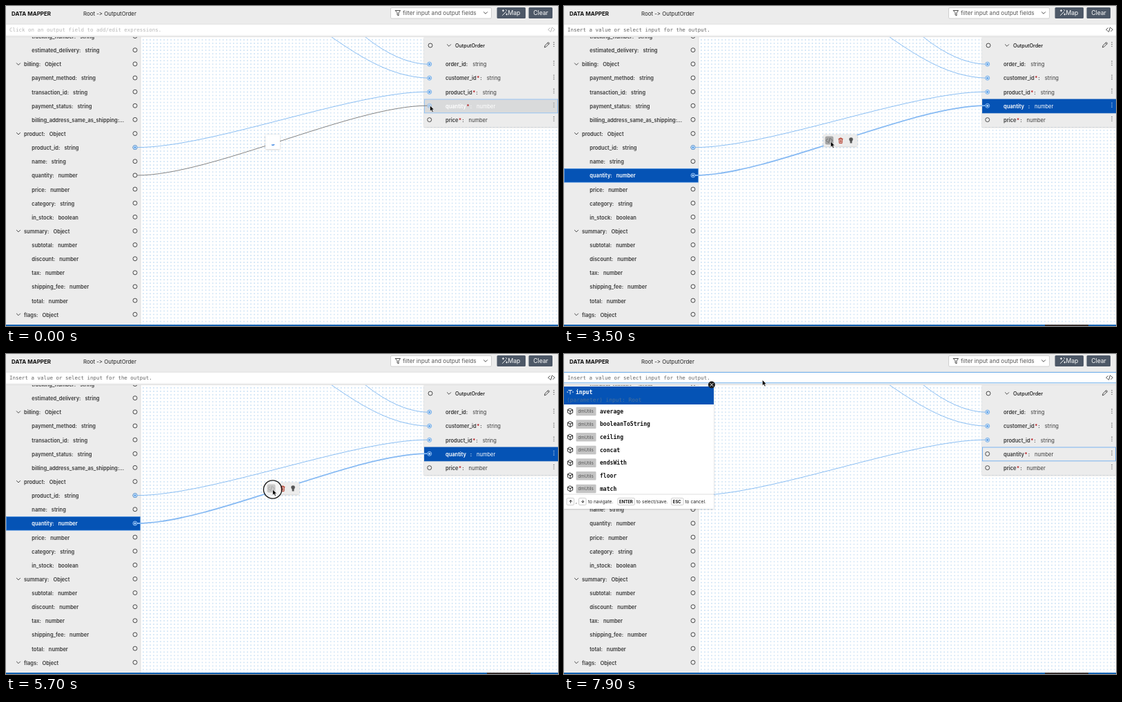
Write an HTML page that moves like this. It is 800x463 px and loops after 8 s.

```html
<!DOCTYPE html>
<html lang="en">
<head>
<meta charset="utf-8">
<title>Data mapper</title>
<style>
  html, body { margin: 0; width: 100%; height: 100%; overflow: hidden; background: #fff; }
  svg { display: block; width: 800px; height: 463px; }
  text { font: 400 7.5px Inter, sans-serif; font-feature-settings: "calt" 0; fill: #3b3b3b; white-space: pre; }
  .b { font-weight: 600; }
  .mono { font: 7.47px "DejaVu Sans Mono", monospace; }
  .name { font: 700 8.08px "DejaVu Sans Mono", monospace; fill: #111; }
  .desc { font: 7.84px "DejaVu Sans Mono", monospace; fill: #49709c; }
  .white, .white tspan { fill: #fff; }
  .line { fill: none; stroke: #3b3b3b; stroke-width: .9; stroke-linecap: round; stroke-linejoin: round; }
  .link { fill: none; stroke: #7db7f2; stroke-width: .9; }
  .thick { stroke-width: 1.8; stroke: #85b9f3; }
</style>
</head>
<body>
<svg id="stage" viewBox="0 0 800 463"></svg>
<script>
const LOOP = 8000;
const LINKED = 400, HOVER = 700, PICKED = 1600, EDIT = 3300, POPUP = 6200, CLEARED = 6900;
const BLUE = '#0553b5', PANEL = '#ececec';

const rect = (x, y, w, h, fill, more = '') =>
  `<rect x="${x}" y="${y}" width="${w}" height="${h}" fill="${fill}" ${more}/>`;
const text = (x, y, s, cls = '', more = '') => `<text x="${x}" y="${y}" class="${cls}" ${more}>${s}</text>`;
const line = (d, more = '') => `<path class="line" d="${d}" ${more}/>`;
const at = (x, y, body) => `<g transform="translate(${x} ${y})">${body}</g>`;
// Visible only between the given times, e.g. "0-400,900-1200".
const during = (times, body) => `<g data-on="${times}">${body}</g>`;

const chevron = (x, y) => line(`M${x - 2.6} ${y - 1.3}l2.6 2.6 2.6 -2.6`);
const port = (x, y) => `<circle cx="${x}" cy="${y}" r="3" fill="${PANEL}" stroke="#3b3b3b" stroke-width=".9"/>`;
const joint = (x, y, color = '#5ba4f0', back = PANEL) =>
  `<circle cx="${x}" cy="${y}" r="3" fill="${back}" stroke="${color}" stroke-width=".9"/>
   <circle cx="${x}" cy="${y}" r="1.6" fill="${color}"/>`;
const kebab = (y, color = '#444') =>
  [-2.8, 0, 2.8].map(d => `<circle cx="794" cy="${y + d}" r=".65" fill="${color}"/>`).join('');
const codeIcon = (x, y, color) =>
  at(x, y, line('M-2.3 -2.4L-4.7 0L-2.3 2.4M2.3 -2.4L4.7 0L2.3 2.4M1 -3.2L-1 3.2', `style="stroke:${color}"`));
const cube = y => at(9, y, line('M0 -4L3.6 -2.2V2L0 4L-3.6 2V-2.2ZM-3.6 -2.2L0 -.4L3.6 -2.2M0 -.4V4', 'style="stroke:#111"'));

const curve = (x1, y1, x2, y2, cls = '', more = '') =>
  `<path class="link ${cls}" d="M${x1} ${y1}C${x1 + 108} ${y1} ${x2 - 108} ${y2} ${x2} ${y2}" ${more}/>`;

// Input tree
const rowY = i => 44.3 + 20.13 * i;
const inputs = `tracking_number string|estimated_delivery string|billing Object|payment_method string
|transaction_id string|payment_status string|billing_address_same_as_shipping …|product Object
|product_id string|name string|quantity number|price number|category string|in_stock boolean
|summary Object|subtotal number|discount number|tax number|shipping_fee number|total number|flags Object`
  .replace(/\n/g, '').split('|').map(s => s.split(' '));

function inputText(i, cls = '') {
  const [name, type] = inputs[i];
  const gap = type === '…' ? 0 : 6;
  return text(type === 'Object' ? 26 : 37.3, rowY(i) + 2.8, `${name}:<tspan dx="${gap}">${type}</tspan>`, 'b ' + cls);
}

const inputPanel = `<g clip-path="url(#body)">
  ${rect(0, 45, 195, 416, PANEL)}
  ${line('M195 45V461', 'style="stroke:#dcdcdc"')}
  ${inputs.map(([, type], i) => inputText(i) + (type === 'Object' ? chevron(18, rowY(i) - .5) : '')
    + port(187, rowY(i) - .7)).join('')}
  ${joint(187, 204.6)}
  ${during(`${LINKED}-${CLEARED}`, joint(187, 245))}
  ${during(`${PICKED}-${CLEARED}`, rect(.5, 235.3, 194, 19.8, BLUE, 'stroke="#4b93e6" stroke-width=".7"')
    + inputText(10, 'white') + joint(187, 245, '#a9d0fb', BLUE))}
</g>`;

// Output tree
const outputs = [['order_id', 'string'], ['customer_id', 'string', 1], ['product_id', 'string', 1],
  ['quantity', 'number', 1], ['price', 'number', 1]];
const outY = i => 84.5 + 20.13 * i;

function outputText(i, cls = '', star = '#b3161b') {
  const [name, type, required] = outputs[i];
  const mark = required ? `<tspan dx=".6" style="fill:${star}">*</tspan><tspan dx="1">:</tspan>` : ':';
  return text(637, outY(i) + 2.8, `<tspan class="b">${name}${mark}</tspan><tspan dx="7">${type}</tspan>`, cls);
}

const outRow = (fill, stroke) => rect(606.5, 135, 193, 19.8, fill, `stroke="${stroke}" stroke-width=".9"`);
const outputPanel = `
  ${rect(606, 45, 194, 130, PANEL, 'filter="url(#shadow)"')}
  ${port(615, 57)}${chevron(642, 57)}
  ${text(651, 60, 'OutputOrder', '', 'style="font-weight:500;font-size:7.2px;fill:#111"')}
  ${line('M780.5 59.5l.7 -2.4 4.7 -4.7 1.7 1.7 -4.7 4.7zM784.8 53.5l1.7 1.7')}
  ${kebab(55.5)}
  ${outputs.map((_, i) => outputText(i) + kebab(outY(i) - 1.7)
    + (i < 3 ? joint : port)(613.7, outY(i) - .4)).join('')}
  ${during(`0-${LINKED}`, outRow('#d9dadb', '#8fc0f4') + outputText(3, 'white') + kebab(143.2, '#777')
    + joint(613.7, 144.3, '#8fc0f4', '#d9dadb'))}
  ${during(`${LINKED}-${PICKED}`, joint(613.7, 144.3))}
  ${during(`${PICKED}-${CLEARED}`, outRow(BLUE, BLUE) + outputText(3, 'white', 'transparent')
    + kebab(143.2, '#dbe9fa') + joint(613.7, 144.3, '#a9d0fb', BLUE))}
  ${during(`${CLEARED}-${LOOP}`, outRow('none', '#6eacf0'))}`;

const quantity = (cls, more) => curve(190, 245, 610.5, 144.2, cls, more);
const links = `<g clip-path="url(#body)">
  <path class="link" d="M521 45C550 68 580 83 610.5 84.2M472 45C520 78 560 102 610.5 104.2"/>
  ${curve(190, 204.6, 610.5, 124.2)}
  ${during(`0-${LINKED}`, quantity('', 'style="stroke:#777"'))}
  ${during(`${LINKED}-${HOVER}`, quantity())}
  ${during(`${HOVER}-${CLEARED}`, quantity('thick'))}
</g>`;

const loadingBox = during(`0-${LINKED}`, rect(376, 186, 21, 21, '#fff', 'rx="1.5" filter="url(#shadow)"')
  + line('M385.3 201Q387 201.6 388.6 200.6', 'style="stroke:#2f7de0;stroke-width:1.3"'));

const toolbar = during(`${PICKED}-${CLEARED}`, `
  ${rect(376, 186, 49, 17, PANEL, 'rx="1.5" filter="url(#shadow)"')}
  ${rect(378.5, 188.5, 12, 12, '#a6a6a6', 'rx="2"')}
  ${codeIcon(384.5, 194.5, '#666')}
  ${at(401, 194.8, line('M-3 -2.5H3M-1.2 -2.5V-3.8H1.2V-2.5M-2.4 -2.5L-2 3.8H2L2.4 -2.5M-.7 -.8V2.2M.8 -.8V2.2',
    'style="stroke:#b3321f"'))}
  ${at(416, 194.5, '<path d="M-1.4 1.8C-1.4 .6 -2.8 .2 -2.8 -1.4A2.8 2.8 0 0 1 2.8 -1.4C2.8 .2 1.4 .6 1.4 1.8V4H-1.4Z" fill="#555"/>')}`);

const button = (x, w, tx, label) => rect(x, 2, w, 16, '#4d5867', 'rx="1.5"')
  + text(tx, 13.2, label, 'white', 'style="font-size:8.6px"');
const header = `
  ${rect(0, 0, 800, 26, PANEL)}
  ${text(8, 14, 'DATA MAPPER', '', 'style="font-size:8px;font-weight:700;fill:#111"')}
  ${text(112, 14, 'Root -&gt; OutputOrder', '', 'style="font-size:7.9px;fill:#222"')}
  ${rect(557.5, 2.5, 146, 15.5, '#fff', 'rx="1.5" stroke="#cbcbcb" stroke-width=".9"')}
  ${line('M564.5 6.5H571.5L569 10V14L567 12.8V10Z')}
  ${text(575, 13, 'filter input and output fields', '', 'style="font-size:8.2px;fill:#555"')}
  ${chevron(695, 10)}
  ${button(711.5, 41.5, 727.5, 'Map')}${button(757.5, 34.5, 764.3, 'Clear')}
  ${line('M719.5 13.5L724.5 8.5M720.5 5.5V8M719.3 6.7H721.7M725.7 11V13M724.7 12H726.7M724.5 5.5L725.8 6.8', 'style="stroke:#fff"')}
  ${rect(0, 26, 800, 16, '#fff')}${rect(0, 42, 800, 3, '#f2f2f2')}
  ${line('M0 26.3H800M0 44.5H800', 'style="stroke:#d4d4d4;stroke-width:.7"')}
  ${during(`0-${EDIT}`, text(5, 36.7, 'Click on an output field to add/edit expressions.', 'mono', 'style="fill:#b8b8b8"')
    + codeIcon(790.5, 34.2, '#aaa'))}
  ${during(`${EDIT}-${LOOP}`, text(5, 36.7, 'Insert a value or select input for the output.', 'mono', 'style="fill:#666"')
    + codeIcon(790.5, 34.2, '#333'))}
  ${during(`${POPUP}-${LOOP}`, line('M0 26.5H800M0 41.8H800', 'style="stroke:#5ba4ea"'))}
  ${during('6200-6800,7300-7800', line('M5.2 30.5V38', 'style="stroke:#111"'))}`;

// Completion list
const functions = ['average', 'booleanToString', 'ceiling', 'concat', 'endsWith', 'floor', 'match', 'max'];
const choice = (name, y, cls = '') => cube(y) + rect(17.5, y - 6.3, 29, 12.6, '#c4c4c4', 'rx="1"')
  + text(20.3, y + 2.2, 'dmUtils', '', 'style="font-size:6.3px;fill:#555"') + text(52, y + 2.8, name, 'name ' + cls);
const choices = (names, y) => names.map((name, i) => choice(name, y + 18.66 * i)).join('');
const key = (x, w, label, tx) => rect(x, 208.5, w, 10, '#fff', 'rx="1.5" stroke="#bbb" stroke-width=".7"')
  + text(tx, 215.8, label, '', 'style="font-size:6px;font-weight:700;fill:#111"');
const hint = (x, s) => text(x, 216, s, '', 'style="font-size:6.6px;fill:#222"');

const popup = during(`${POPUP}-${LOOP}`, `
  ${rect(0, 46, 217, 178, '#fff', 'filter="url(#shadow)"')}
  <g clip-path="url(#list)">
    ${during(`${POPUP}-${CLEARED}`, rect(0, 47, 217, 30, BLUE) + choice('average', 56.8, 'white')
      + text(4, 73, 'Calculates the average of multiple numbers.', 'desc') + choices(functions.slice(1), 86.6))}
    ${during(`${CLEARED}-${LOOP}`, rect(0, 47, 217, 26, BLUE)
      + line('M6.5 52.5H11.5M9 52.5V58M4.5 55H5.8M12.2 55H13.5', 'style="stroke:#fff"')
      + text(17, 57.8, 'input', 'name white') + text(4, 69, '(parameter) input: Root', 'desc')
      + choices(functions.slice(0, 7), 83))}
  </g>
  ${line('M0 203H217', 'style="stroke:#d0d0d0;stroke-width:.7"')}
  ${key(4, 10.5, '↑', 7)}${hint(17, ',')}${key(21.5, 10.5, '↓', 24.5)}${hint(35, 'to navigate.')}
  ${key(78, 24.5, 'ENTER', 80)}${hint(105, 'to select/save.')}
  ${key(155.5, 17.5, 'ESC', 157.8)}${hint(175.5, 'to cancel.')}
  <circle cx="214" cy="44.5" r="5" fill="#1b1b1b"/>
  ${line('M211.8 42.3l4.4 4.4M216.2 42.3l-4.4 4.4', 'style="stroke:#fff"')}`);

const ring = during('1500-1700,5600-5900',
  '<circle r="13.2" cx="0" cy="0" fill="#fff" fill-opacity=".4" stroke="#111" stroke-width="1.3"/>');

const stage = document.getElementById('stage');
stage.innerHTML = `
  <defs>
    <pattern id="dots" x="196.5" y="46.5" width="5.03" height="5.03" patternUnits="userSpaceOnUse">
      <circle cx="2.5" cy="2.5" r=".58" fill="#7fb5e6"/></pattern>
    <filter id="shadow" x="-20%" y="-20%" width="140%" height="140%">
      <feDropShadow dx="0" dy=".5" stdDeviation="1.2" flood-color="#000" flood-opacity=".25"/></filter>
    <clipPath id="body"><rect y="45" width="800" height="416"/></clipPath>
    <clipPath id="list"><rect y="46" width="217" height="157"/></clipPath>
  </defs>
  ${rect(0, 0, 800, 463, '#fff')}${rect(195, 45, 605, 416, 'url(#dots)')}
  ${inputPanel}${outputPanel}${links}${loadingBox}${toolbar}${header}
  ${rect(0, 461, 800, 2, '#1463b3')}
  ${during(`${LINKED}-${LOOP}`, rect(697, 461, 63, 2, '#37302f'))}
  ${popup}
  <g id="pointer">${ring}
    <path d="M0 0V8.2L1.9 6.5L3.3 9.5L4.8 8.8L3.4 5.9H5.9Z" fill="#000" stroke="#fff" stroke-width=".6"/></g>`;

const pointer = document.getElementById('pointer');
const timed = [...stage.querySelectorAll('[data-on]')].map(el =>
  [el, el.dataset.on.split(',').map(span => span.split('-').map(Number))]);

// time, x, y
const pointerPath = [[0, 614.5, 144], [200, 614.5, 144], [750, 405.5, 192], [1800, 405.5, 192], [2300, 381.5, 192.5],
  [2700, 381.5, 192.5], [3100, 386.5, 196], [7000, 386.5, 196], [7700, 287.5, 37.5], [LOOP, 287.5, 37.5]];

function pointerAt(t) {
  const i = pointerPath.findIndex(p => p[0] > t);
  const [t0, x0, y0] = pointerPath[i - 1], [t1, x1, y1] = pointerPath[i];
  const u = (t - t0) / (t1 - t0), e = u * u * (3 - 2 * u);
  return [x0 + (x1 - x0) * e, y0 + (y1 - y0) * e];
}

function draw(now) {
  const t = Math.max(0, now) % LOOP;
  for (const [el, spans] of timed) el.style.display = spans.some(([a, b]) => t >= a && t < b) ? '' : 'none';
  pointer.setAttribute('transform', `translate(${pointerAt(t)})`);
}

const start = performance.now();
function tick() {
  draw(performance.now() - start);
  requestAnimationFrame(tick);
}
tick();
</script>
</body>
</html>
```
